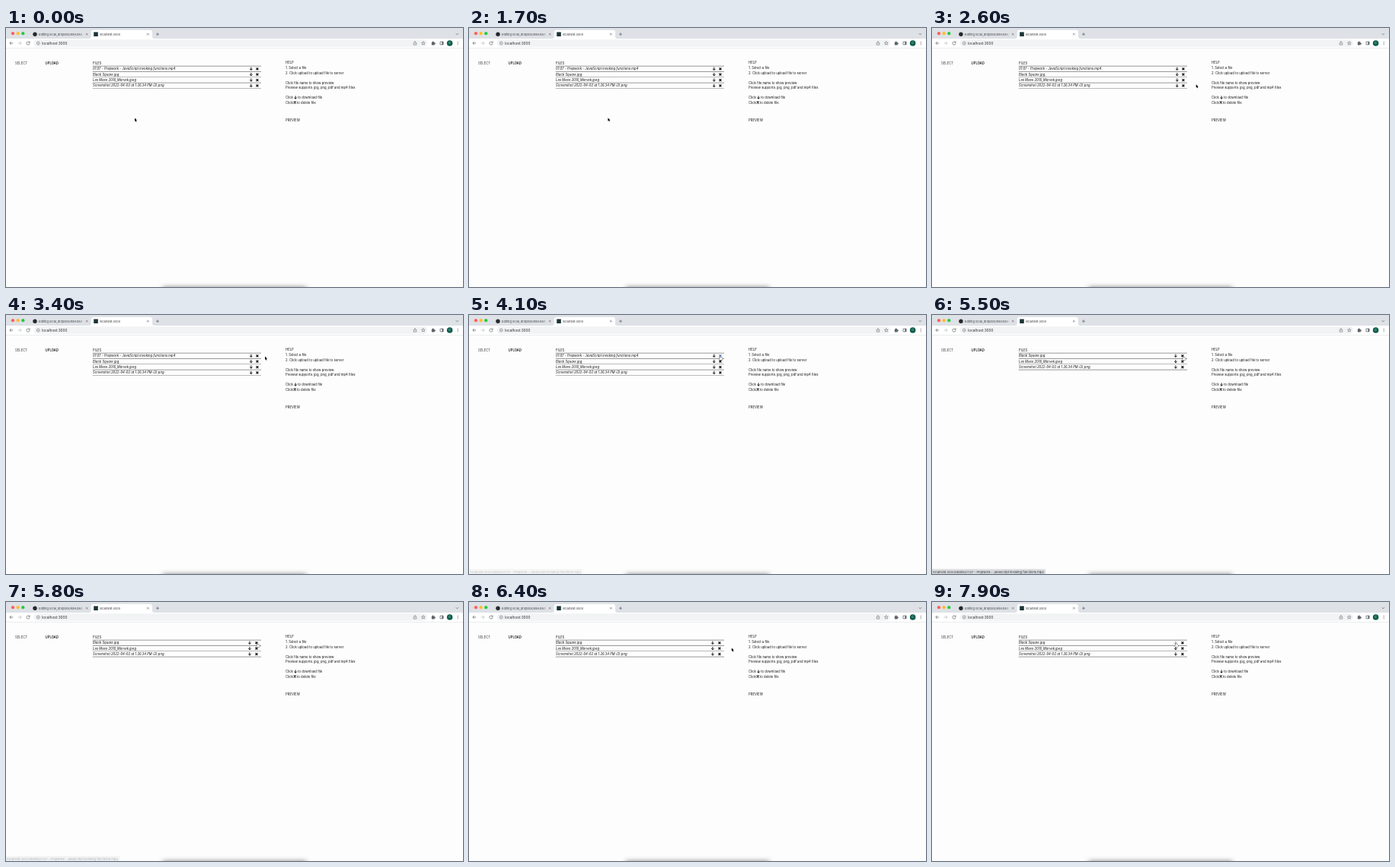
An HTML page with a canvas that plays this animation: 600x341 px, repeating every 8 s.

```html
<!DOCTYPE html>
<html lang="en">
<head>
<meta charset="utf-8">
<title>localhost:3000</title>
<style>
  html, body { margin: 0; width: 100%; height: 100%; overflow: hidden; background: #fdfdfd; }
  canvas { display: block; width: 600px; height: 341px; }
</style>
</head>
<body>
<canvas id="stage"></canvas>
<script>
const W = 600, H = 341, LOOP = 8000, STEP = 100;
const DELETE_AT = 5400;
const INK = '#111', ICON = '#5f6368';
const FILES = [
  '01.07 - Prepwork - JavaScript invoking functions.mp4',
  'Black Square.jpg',
  'Les Mees 2016_Morvek.jpeg',
  'Screenshot 2022-04-02 at 1.26.34 PM (2).png'
];
// Pointer path: time, x, y
const PATH = [
  [0, 169, 118.6], [1600, 169, 118.6], [1700, 182.4, 118.2], [1800, 236, 117.4],
  [1900, 297, 116.6], [2100, 297, 116.6], [2200, 322, 103], [2300, 345.4, 85.4],
  [2500, 345.4, 85.4], [2700, 348, 63], [2800, 348.6, 57.2], [3100, 348.6, 57.2],
  [3400, 340, 54.6], [3700, 333.5, 53.6], [4000, 330, 53.8], [4400, 330.3, 54.2],
  [6100, 330.3, 54.2], [6200, 336, 56], [6300, 342, 59], [6400, 344.8, 60.4],
  [7200, 344.8, 60.4], [7500, 334, 57.6], [7900, 320.4, 54]
];

const canvas = document.getElementById('stage');
const ctx = canvas.getContext('2d');
const dpr = window.devicePixelRatio || 1;
canvas.width = W * dpr;
canvas.height = H * dpr;

const clamp = v => Math.max(0, Math.min(1, v));

// Text is laid out ten times larger and scaled down so advances stay fractional.
function text(str, x, midY, size = 4.25, { color = INK, weight = 400, style = 'normal', align = 'left' } = {}) {
  ctx.save();
  ctx.translate(x, midY + size * 0.364);
  ctx.scale(0.1, 0.1);
  ctx.font = `${style} ${weight} ${size * 10}px Inter, "Liberation Sans", sans-serif`;
  ctx.textAlign = align;
  ctx.fillStyle = color;
  ctx.fillText(str, 0, 0);
  ctx.restore();
}

function rect(x, y, w, h, color, r = 0) {
  ctx.fillStyle = color;
  ctx.beginPath();
  ctx.roundRect(x, y, w, h, r);
  ctx.fill();
}

function disc(x, y, r, color) {
  ctx.fillStyle = color;
  ctx.beginPath();
  ctx.arc(x, y, r, 0, Math.PI * 2);
  ctx.fill();
}

function shape(d, x, y, { fill, stroke, width = 0.7 } = {}) {
  const p = new Path2D(d);
  ctx.save();
  ctx.translate(x, y);
  ctx.lineJoin = 'round';
  if (stroke) {
    ctx.strokeStyle = stroke;
    ctx.lineWidth = width;
    ctx.stroke(p);
  }
  if (fill) {
    ctx.fillStyle = fill;
    ctx.fill(p);
  }
  ctx.restore();
}

const cross = (x, y, r, color, width) =>
  shape(`M${-r} ${-r}L${r} ${r}M${r} ${-r}L${-r} ${r}`, x, y, { stroke: color, width });

const removeIcon = (x, y, color = INK) => cross(x, y, 1.45, color, 1.15);

function downIcon(x, y, color = INK) {
  shape('M0 -2.1V1.5M-1.6 0L0 1.7L1.6 0', x, y, { stroke: color, width: 1 });
}

function drawTabs() {
  rect(0, 0, W, 14, '#dee1e6');
  ['#ff5f57', '#febc2e', '#28c840'].forEach((c, i) => disc(9 + i * 6.65, 7.2, 2.1, c));

  disc(38, 8.2, 2.7, '#24292f');
  const fade = ctx.createLinearGradient(94, 0, 102, 0);
  fade.addColorStop(0, '#45494d');
  fade.addColorStop(1, 'rgba(69,73,77,0)');
  ctx.save();
  ctx.beginPath();
  ctx.rect(43, 3, 59, 10);
  ctx.clip();
  text('Editing local_dropbox/README.md', 43, 8.2, 4, { color: '#45494d' });
  ctx.restore();
  // Fade the clipped title into the strip
  const veil = ctx.createLinearGradient(96, 0, 102, 0);
  veil.addColorStop(0, 'rgba(222,225,230,0)');
  veil.addColorStop(1, '#dee1e6');
  rect(96, 3, 6, 10, veil);
  cross(106.2, 8.2, 1.3, ICON, 0.6);

  shape('M109 14Q111.7 14 111.7 11.3V6Q111.7 2.8 114.9 2.8H188.8Q192 2.8 192 6V11.3Q192 14 194.7 14Z',
    0, 0, { fill: '#fff' });
  rect(115.2, 5.4, 5.6, 5.6, '#1b3438');
  text('localhost:3000', 123, 8.2, 3.85, { color: '#333' });
  cross(186.3, 8.2, 1.3, ICON, 0.6);
  shape('M-2 0H2M0 -2V2', 199, 8.2, { stroke: ICON, width: 0.7 });
  shape('M-1.6 -0.8L0 0.8L1.6 -0.8', 592.3, 8, { stroke: ICON, width: 0.75 });
}

function drawToolbar() {
  rect(0, 14, W, 12.2, '#fff');
  rect(0, 26, W, 0.6, '#d9dbde');
  shape('M2.3 0H-2.1M0 -2.1L-2.1 0L0 2.1', 7, 20, { stroke: ICON });
  shape('M-2.3 0H2.1M0 -2.1L2.1 0L0 2.1', 18, 20, { stroke: '#b5b8bc' });
  shape('M1.6 -1.4A2.1 2.1 0 1 0 2.1 0.5M2.2 -2.5V-0.7H0.4', 29, 20, { stroke: ICON });

  rect(36.5, 15.3, 516.5, 9.4, '#f1f3f4', 4.7);
  shape('M2 0A2 2 0 1 1 -2 0A2 2 0 1 1 2 0M0 -0.3V1.1M0 -1.2V-0.7', 42.3, 20, { stroke: ICON, width: 0.55 });
  text('localhost:3000', 47, 20, 4.75, { color: '#27292c' });
  shape('M-0.9 -0.6H-1.8V2.2H1.8V-0.6H0.9M0 0.8V-2.4M-1.1 -1.4L0 -2.5L1.1 -1.4', 537, 20, { stroke: ICON, width: 0.55 });

  let star = '';
  for (let i = 0; i < 10; i++) {
    const a = -Math.PI / 2 + i * Math.PI / 5, r = i % 2 ? 1.1 : 2.5;
    star += `${i ? 'L' : 'M'}${r * Math.cos(a)} ${r * Math.sin(a)}`;
  }
  shape(star + 'Z', 547.8, 20.1, { stroke: ICON, width: 0.55 });

  rect(558.8, 18.6, 3.9, 3.9, ICON, 0.5);
  disc(560.7, 18.3, 0.9, ICON);
  disc(563, 20.5, 0.9, ICON);
  shape('M-2 -1.9H2V1.9H-2Z', 572, 20, { stroke: ICON, width: 0.75 });
  rect(572.4, 18, 1.7, 4, ICON);
  disc(582.6, 20, 3.8, '#0b5d4b');
  text('C', 582.6, 20, 3.6, { color: '#fff', align: 'center' });
  [-1.7, 0, 1.7].forEach(d => disc(593.2, 20 + d, 0.55, ICON));
}

function drawFiles(t, over) {
  const gone = t >= DELETE_AT;
  const list = gone ? FILES.slice(1) : FILES;
  const downX = gone ? 319.9 : 321.8, delX = gone ? 328.9 : 329.9;
  const line = y => rect(113.7, y, 221.3, 0.6, '#777');
  text('FILES', 114, 46);
  line(49.8);
  list.forEach((name, i) => {
    const y = 53.7 + i * 7.38;
    text(name, 114, y, 4.25, { style: 'italic' });
    downIcon(downX, y + 0.1, !i && over === 'down' ? '#8b9cbd' : INK);
    removeIcon(delX, y + 0.1, !i && over === 'remove' ? '#3f6fd6' : INK);
    line(57.1 + i * 7.38);
  });
}

function drawHelp() {
  const row = n => 45.9 + n * 6.53, x = 367;
  text('HELP', x, row(0));
  text('1. Select a file', x, row(1));
  text('2. Click upload to upload file to server', x, row(2));
  text('Click file name to show preview', x, row(4));
  text('Preview supports: jpg, png, pdf and mp4 files', x, row(5));
  text('Click', x, row(7));
  downIcon(380.1, row(7));
  text('to download file', 383.2, row(7));
  text('Click', x, row(8));
  removeIcon(379.2, row(8));
  text('to delete file', 382, row(8));
  text('PREVIEW', x, 121);
}

function drawStatus(alpha) {
  if (alpha <= 0) return;
  ctx.save();
  ctx.globalAlpha = alpha;
  rect(0, 334.6, 149.2, 6.4, '#d9dbde', [0, 1.2, 0, 0]);
  text('localhost:3000/delete/' + FILES[0], 1.2, 338.1, 4.03, { color: '#33363a' });
  ctx.restore();
}

function drawDockShadow() {
  ctx.save();
  ctx.shadowColor = 'rgba(0,0,0,0.55)';
  ctx.shadowBlur = 6 * dpr;
  ctx.fillStyle = '#000';
  ctx.fillRect(206, 341.5, 188, 6);
  ctx.restore();
}

function pointer(t) {
  let i = PATH.findIndex(p => p[0] > t);
  if (i < 0) return PATH[PATH.length - 1].slice(1);
  const [t0, x0, y0] = PATH[i - 1], [t1, x1, y1] = PATH[i];
  const k = (t - t0) / (t1 - t0);
  return [x0 + (x1 - x0) * k, y0 + (y1 - y0) * k];
}

function hit(x, y) {
  if (y > 57) return '';
  if (Math.abs(x - 329.8) < 2.3) return 'remove';
  return Math.abs(x - 320.4) < 2.2 ? 'down' : '';
}

function drawPointer(x, y, hand) {
  if (hand) {
    shape('M-0.5 0.3Q0 -0.4 0.5 0.3V2L2.3 2.5Q2.8 2.7 2.7 3.4L2.2 5.2H-0.7L-2 3.4Q-1.6 2.7 -0.5 3.5Z',
      x, y, { fill: '#fff', stroke: '#222', width: 0.8 });
  } else {
    shape('M0 0V4.4L1 3.5L1.7 5.1L2.5 4.8L1.8 3.2H3.1Z', x, y, { fill: '#000', stroke: '#fff', width: 0.8 });
  }
}

function render(now) {
  const t = Math.floor(now % LOOP / STEP) * STEP;
  const [x, y] = pointer(t);
  const target = hit(x, y);
  const reloaded = t >= DELETE_AT && t < 6300;
  const status = t < DELETE_AT ? clamp((t - 4000) / 400) : clamp((5900 - t) / 300);

  ctx.setTransform(dpr, 0, 0, dpr, 0, 0);
  rect(0, 0, W, H, '#fdfdfd');
  drawTabs();
  drawToolbar();
  text('SELECT', 12, 46, 4.25, { color: '#333' });
  text('UPLOAD', 51.6, 46, 4.25, { weight: 500, color: '#000' });
  drawFiles(t, reloaded ? '' : target);
  drawHelp();
  drawDockShadow();
  drawStatus(status);
  drawPointer(x, y, target !== '');
}

const start = performance.now();
function frame() {
  render(performance.now() - start);
  requestAnimationFrame(frame);
}
frame();
</script>
</body>
</html>
```
